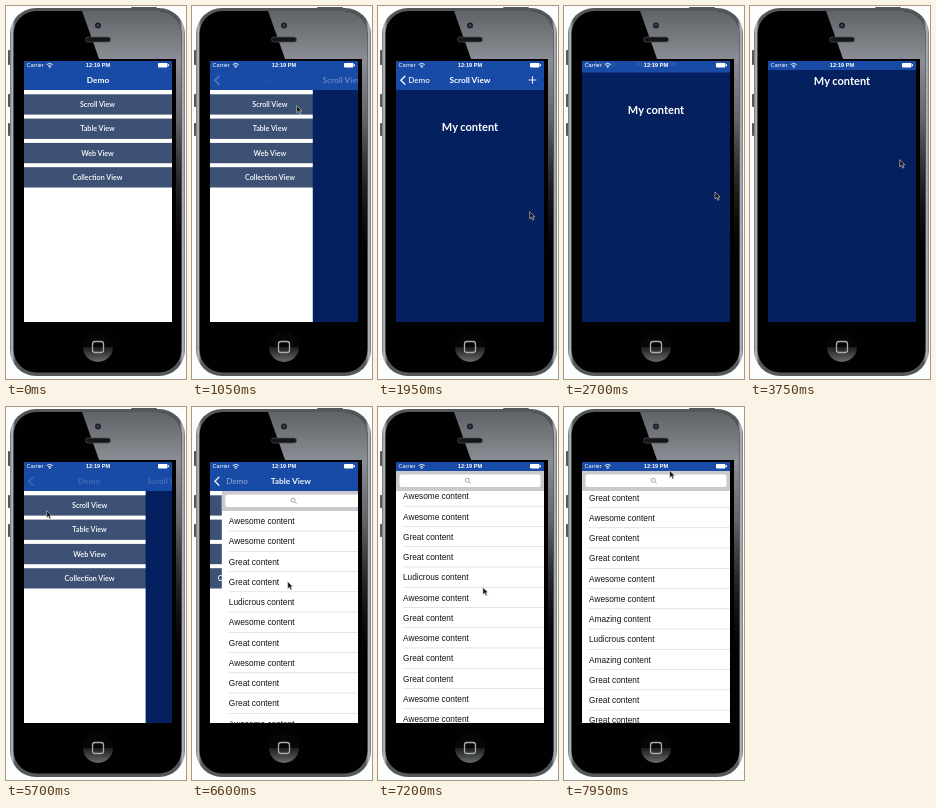
Animation of 180x373 px, one loop 8 s. Source, as an HTML page:

```html
<!DOCTYPE html>
<html lang="en">
<head>
<meta charset="utf-8">
<title>Scrolling navigation bar</title>
<style>
  html, body { margin: 0; width: 100%; height: 100%; overflow: hidden; background: #fcfdfd; }
  svg { display: block; width: 100%; height: 100%; }
  text { fill: #fff; font-family: Lato, "Open Sans", sans-serif; }
  .mid { text-anchor: middle; }
  .label { font-size: 7.2px; font-weight: 600; }
  .title { font-size: 8.3px; font-weight: 700; }
  .back { font-size: 8.1px; font-weight: 500; }
  .content { font-size: 11px; font-weight: 700; }
  .status { font: 5.6px "Liberation Sans", Arial, sans-serif; }
  .clock { font-weight: 700; }
  .row { fill: #111; font: 8.3px "Liberation Sans", Arial, sans-serif; }
  .line { fill: none; stroke: #fff; stroke-linecap: round; }
</style>
</head>
<body>
<svg viewBox="0 0 180 373" preserveAspectRatio="none">
  <defs>
    <linearGradient id="rim" x1="0" x2="1" y1="0" y2="0">
      <stop offset="0" stop-color="#6d7173"/>
      <stop offset=".012" stop-color="#b9bdbf"/>
      <stop offset=".03" stop-color="#54585a"/>
      <stop offset=".97" stop-color="#54585a"/>
      <stop offset=".988" stop-color="#b9bdbf"/>
      <stop offset="1" stop-color="#6d7173"/>
    </linearGradient>
    <linearGradient id="gloss" x1="0" y1="0" x2="0" y2="1">
      <stop offset="0" stop-color="#5d6064"/>
      <stop offset=".21" stop-color="#8b8e94"/>
      <stop offset=".45" stop-color="#7b7e83" stop-opacity=".8"/>
      <stop offset="1" stop-color="#222" stop-opacity="0"/>
    </linearGradient>
    <linearGradient id="home" x1="0" y1="0" x2="0" y2="1">
      <stop offset="0" stop-color="#060606"/>
      <stop offset=".5" stop-color="#191b1c"/>
      <stop offset="1" stop-color="#686a6c"/>
    </linearGradient>
    <clipPath id="face"><rect x="7.5" y="5" width="168" height="361.5" rx="23"/></clipPath>
    <clipPath id="screen"><rect x="18" y="55" width="148" height="261"/></clipPath>
  </defs>

  <!-- phone body -->
  <g fill="#55595b">
    <rect x="125" y="1" width="26" height="3" rx="1"/>
    <rect x="2" y="44" width="4" height="15" rx="1"/>
    <rect x="2" y="88" width="4" height="13" rx="1"/>
    <rect x="2" y="117" width="4" height="13" rx="1"/>
  </g>
  <rect x="4" y="2" width="175" height="368" rx="26" fill="url(#rim)"/>
  <rect x="7.5" y="5" width="168" height="361.5" rx="23" fill="#010101"/>
  <path d="M75 2H178V250H163Z" fill="url(#gloss)" clip-path="url(#face)"/>
  <circle cx="92" cy="19.5" r="3" fill="#1c1f24"/>
  <circle cx="92" cy="19.5" r="1.4" fill="#33415c"/>
  <rect x="79.5" y="31" width="25" height="5" rx="2.5" fill="#151617" stroke="#4c4f51" stroke-width=".7"/>
  <circle cx="92" cy="341" r="15" fill="url(#home)"/>
  <path d="M77 341a15 15 0 0 1 30 0z" fill="#060606"/>
  <rect x="86.5" y="335.5" width="11" height="11" rx="2.5" fill="none" stroke="#a9acad" stroke-width="1.3"/>
  <rect x="17" y="53" width="153" height="264" fill="#010101"/>

  <g clip-path="url(#screen)">
    <rect x="18" y="54" width="149" height="263" fill="#fff"/>
    <g id="menu"></g>

    <g id="scrollPage">
      <rect x="18" y="54" width="149" height="263" fill="#04205f"/>
      <text id="content" class="content mid" x="92" y="125">My content</text>
    </g>

    <g id="tablePage">
      <rect x="18" y="54" width="149" height="263" fill="#fff"/>
      <g id="rows"></g>
      <g id="search">
        <rect x="18" y="83" width="149" height="21" fill="#c9c9ce"/>
        <rect x="21.5" y="87.5" width="141" height="12.5" rx="2" fill="#fff"/>
        <g fill="none" stroke="#8e8e93" stroke-width=".8">
          <circle cx="89.3" cy="93.2" r="2"/>
          <path d="M90.8 94.7l2 2"/>
        </g>
      </g>
    </g>

    <rect id="bar" x="18" y="54" width="149" height="30" fill="#184ba6"/>
    <g id="items">
      <path id="chevron" class="line" stroke-width="1.3" d="M26.9 70.3l-4 4 4 4"/>
      <text id="back" class="back mid" y="77.4">Demo</text>
      <text id="heading" class="title mid" y="77.4"></text>
      <path id="plus" class="line" stroke-width=".9" d="M151 74h7M154.5 70.5v7"/>
    </g>
    <g>
      <text class="status" x="20.5" y="61.3">Carrier</text>
      <g class="line" stroke-width=".9">
        <path d="M41 58.3q2.7-2.2 5.4 0M42.3 59.9q1.4-1.2 2.8 0"/>
        <circle cx="43.7" cy="61.1" r=".2"/>
      </g>
      <text class="status clock mid" x="92" y="61.3">12:19 PM</text>
      <rect x="152" y="57" width="9.5" height="4.4" rx=".8" fill="#fff"/>
      <rect x="162" y="58.3" width="1" height="1.8" fill="#fff"/>
    </g>
  </g>

  <path id="cursor" d="M.7 .6v7.2l1.7-1.5l1.2 2.8l1.3-.6l-1.2-2.7h2.2Z" fill="#111" stroke="#ddd" stroke-width=".6"/>
</svg>

<script>
const $ = id => document.getElementById(id);
const NS = 'http://www.w3.org/2000/svg';
const LOOP = 8000, STEP = 150;
const WIDTH = 148, ROW = 20.25, BAR_TRAVEL = 20;

function add(parent, tag, attrs, text = '') {
  const el = document.createElementNS(NS, tag);
  for (const k in attrs) el.setAttribute(k, attrs[k]);
  el.textContent = text;
  parent.append(el);
}

['Scroll View', 'Table View', 'Web View', 'Collection View'].forEach((name, i) => {
  const y = 88.3 + i * 24.3;
  add($('menu'), 'rect', { x: 18, y, width: 149, height: 20.3, fill: '#3c5174' });
  add($('menu'), 'text', { x: 91.5, y: y + 12.8, class: 'label mid' }, name);
});

const words = { A: 'Awesome', G: 'Great', L: 'Ludicrous', M: 'Amazing' };
[...'AAGGLAGAGGAAMLMGGGA'].forEach((key, i) => {
  const y = 104 + i * ROW;
  add($('rows'), 'text', { x: 25, y: y + 13.2, class: 'row' }, words[key] + ' content');
  add($('rows'), 'rect', { x: 25, y: y + ROW - .5, width: 142, height: .6, fill: '#d2d2d5' });
});

const smooth = u => u * u * (3 - 2 * u);
const easeOut = u => 1 - (1 - u) ** 2;

// Piecewise interpolation over [time, value] keys.
function track(keys, t, ease = smooth) {
  if (t <= keys[0][0]) return keys[0][1];
  for (let i = 1; i < keys.length; i++) {
    const [t0, a] = keys[i - 1], [t1, b] = keys[i];
    if (t < t1) return a + (b - a) * ease((t - t0) / (t1 - t0));
  }
  return keys[keys.length - 1][1];
}

const scrollPush = [[980, 0], [1400, 1], [5440, 1], [5890, 0]];
const tablePush = [[6313, 0], [6713, 1]];
const pageScroll = [[2050, 0], [3600, 46], [4050, 46], [4750, 0]];
const tableScroll = [[6950, 0], [7900, 145]];
const cursorX = [[400, 182], [600, 104], [1350, 104], [1850, 151], [2050, 151], [3600, 149],
  [4050, 149], [4750, 150], [5200, 43.5], [5500, 41], [5700, 40], [6100, 84], [6350, 84],
  [6600, 95], [6900, 104], [7900, 105]];
const cursorY = [[400, 150], [600, 99], [1350, 99], [1850, 205], [2050, 205], [3600, 153],
  [4050, 153], [4750, 203], [5200, 81.5], [5500, 78], [5700, 103], [6100, 122], [6350, 122],
  [6600, 174], [6900, 212], [7900, 63]];

const set = (id, name, value) => $(id).setAttribute(name, value);
const move = (id, x, y) => set(id, 'transform', `translate(${x} ${y})`);
const fade = (id, a) => set(id, 'opacity', a);

function render(t) {
  const onTable = t >= 6200;
  const push = track(onTable ? tablePush : scrollPush, t, easeOut);
  const scroll = track(onTable ? tableScroll : pageScroll, t);
  const lift = Math.min(scroll, BAR_TRAVEL);
  const pageX = (1 - push) * WIDTH;

  move('menu', -.3 * WIDTH * push, 0);
  move('scrollPage', onTable ? 2 * WIDTH : pageX, 0);
  move('tablePage', onTable ? pageX : 2 * WIDTH, 0);
  move(onTable ? 'rows' : 'content', 0, -scroll);
  move('search', 0, -lift);

  set('bar', 'height', 30 - lift);
  move('items', 0, -lift);
  fade('items', 1 - lift / BAR_TRAVEL);
  fade('chevron', push);
  set('back', 'x', 92 - 51 * push);
  set('back', 'class', push < .5 ? 'title mid' : 'back mid');
  fade('back', Math.abs(2 * push - 1) ** 4);
  $('heading').textContent = onTable ? 'Table View' : 'Scroll View';
  set('heading', 'x', 92 + 85 * (1 - push));
  fade('heading', push);
  fade('plus', onTable ? 0 : push ** 2);

  move('cursor', track(cursorX, t), track(cursorY, t));
  fade('cursor', t < 450 ? 0 : 1);
}

const start = performance.now();
function tick() {
  const t = (performance.now() - start) % LOOP;
  render(Math.floor(t / STEP) * STEP);
  requestAnimationFrame(tick);
}
tick();
</script>
</body>
</html>
```
